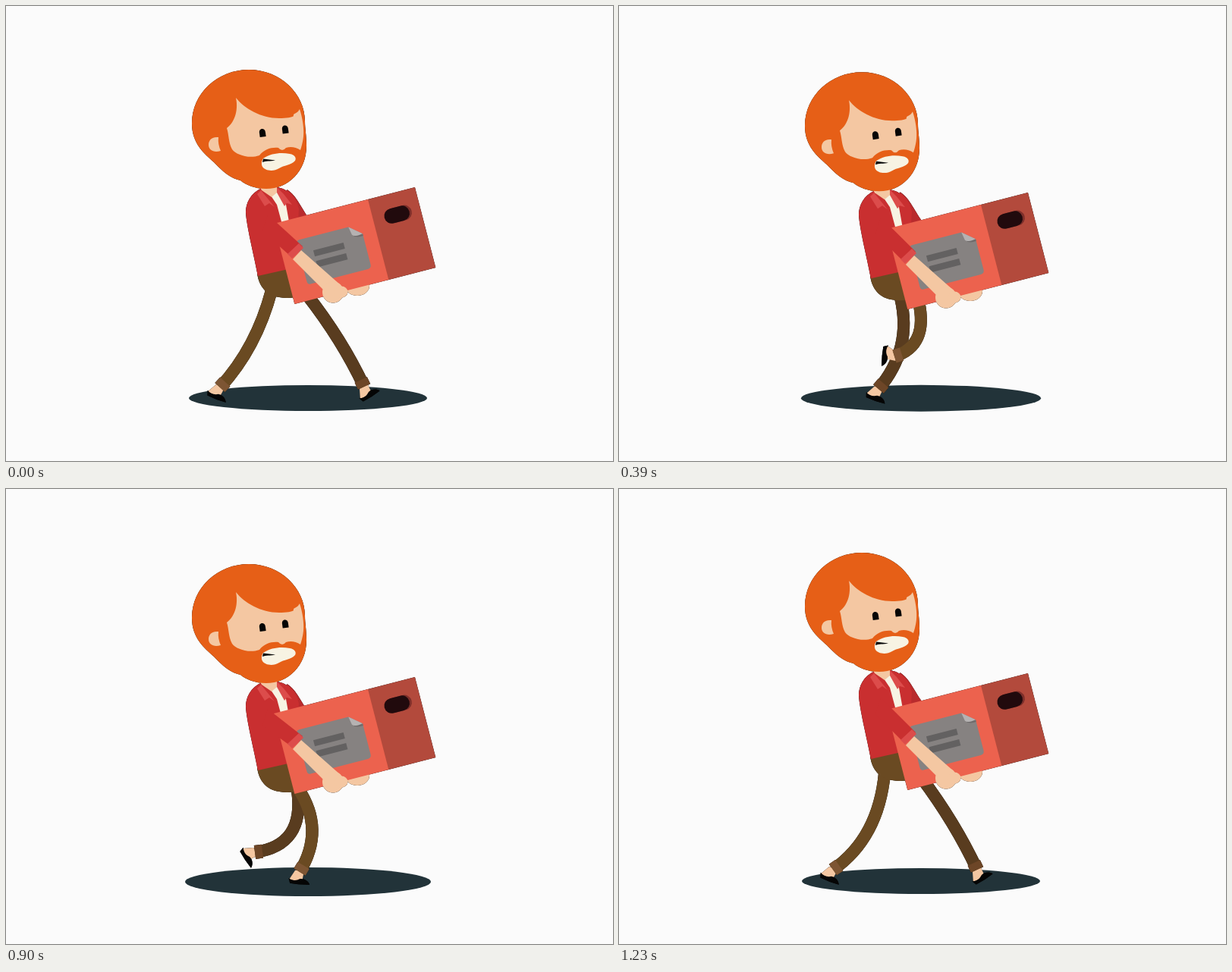
These frames come from a looping animation (800 by 600 pixels, 1260 ms). An HTML page with a canvas:

```html
<!DOCTYPE html>
<html lang="en">
<head>
<meta charset="utf-8">
<title>Carrying a box</title>
<style>
html, body { margin: 0; width: 100%; height: 100%; overflow: hidden; background: #fbfbfb; }
canvas { display: block; }
</style>
</head>
<body>
<canvas id="stage" width="800" height="600"></canvas>
<script>
const LOOP = 1260, STEP = 30;
const stage = document.getElementById('stage').getContext('2d');
const layer = document.createElement('canvas');
layer.width = 800;
layer.height = 600;
const ctx = layer.getContext('2d');

const SKIN = '#f4c7a2', HAIR = '#e65f17', RED = '#c92f30', FLAP = '#dc4c4b',
      CREAM = '#f7f3e3', PANTS = '#6a4a22', BLACK = '#050505';

// Vertical drop in px: [time, drop]
const BODY = [[0, 0], [270, 15], [440, 0], [630, 0], [900, 15], [1206, 0], [1260, 0]];
const BOX = [[0, 0], [275, 9.1], [390, 7], [630, 2], [700, .5], [900, 9], [1020, 7], [1230, 4], [1260, 3.3]];

// Leg poses: [time, hip x, y, bend x, y, ankle x, y, foot angle]
const NEAR_LEG = cyclic([
  [0, 350, 375, 330, 451, 282, 503, 20],
  [270, 365, 390, 368, 472, 315, 480, 88],
  [390, 395, 390, 408, 448, 363, 462, 94],
  [630, 387, 383, 434, 436, 461, 492, -15],
  [690, 386, 388, 434, 440, 446, 503, -4],
  [900, 385, 395, 421, 449, 387, 505, 3],
  [1020, 372, 388, 399, 440, 351, 505, 11],
  [1230, 350, 375, 342, 460, 282, 502, 20]
]);
const FAR_LEG = cyclic([
  [0, 396, 380, 443, 440, 472, 502, -34],
  [90, 394, 386, 440, 442, 445, 504, -6],
  [270, 393, 395, 424, 449, 387, 505, 3],
  [390, 371, 385, 387, 452, 342, 505, 18],
  [630, 359, 380, 355, 452, 303, 508, 48],
  [900, 384, 398, 394, 470, 328, 479, 55],
  [1020, 398, 390, 432, 437, 385, 484, 25],
  [1230, 398, 380, 443, 440, 472, 502, -34]
]);

function cyclic(keys) {
  const shift = (key, by) => [key[0] + by, ...key.slice(1)];
  return [shift(keys.at(-1), -LOOP), ...keys, shift(keys[0], LOOP), shift(keys[1], LOOP)];
}

// Monotone cubic interpolation between keys
function sample(keys, time) {
  let i = 0;
  while (i < keys.length - 2 && keys[i + 1][0] <= time) i++;
  const slope = (a, j) => keys[a] && keys[a + 1]
    ? (keys[a + 1][j] - keys[a][j]) / (keys[a + 1][0] - keys[a][0]) : 0;
  const tangent = (a, j) => {
    const before = slope(a - 1, j), after = slope(a, j);
    return before * after > 0 ? 2 * before * after / (before + after) : 0;
  };
  const p = keys[i], q = keys[i + 1], span = q[0] - p[0], u = (time - p[0]) / span;
  return p.slice(1).map((v, k) => {
    const j = k + 1, ease = u * u * (3 - 2 * u);
    return v + (q[j] - v) * ease
      + span * u * (1 - u) * ((1 - u) * tangent(i, j) - u * tangent(i + 1, j));
  });
}

function fill(color, d) {
  ctx.fillStyle = color;
  ctx.fill(new Path2D(d));
}

function oval(color, x, y, rx, ry = rx, target = ctx) {
  target.fillStyle = color;
  target.beginPath();
  target.ellipse(x, y, rx, ry, 0, 0, 7);
  target.fill();
}

function pill(color, x, y, w, h, r) {
  ctx.fillStyle = color;
  ctx.beginPath();
  ctx.roundRect(x, y, w, h, r);
  ctx.fill();
}

function placed(x, y, degrees, draw) {
  ctx.save();
  ctx.translate(x, y);
  ctx.rotate(degrees * Math.PI / 180);
  draw();
  ctx.restore();
}

function drawLeg([hx, hy, bx, by, ax, ay, angle], color, cuff) {
  placed(ax, ay, angle, () => {
    fill(SKIN, 'M-13 10L-6-2H6L4 11Q-4 14-13 10Z');
    fill(BLACK, 'M-14 9L-12 15.5Q0 17 14 16C12 11 6 8 1 9C-4 12-9 12-14 9Z');
  });
  ctx.lineWidth = 16;
  ctx.strokeStyle = color;
  ctx.beginPath();
  ctx.moveTo(hx, hy);
  ctx.quadraticCurveTo(bx, by, ax, ay);
  ctx.stroke();
  const len = Math.hypot(ax - bx, ay - by);
  ctx.lineWidth = 18;
  ctx.strokeStyle = cuff;
  ctx.beginPath();
  ctx.moveTo(ax - (ax - bx) / len * 10, ay - (ay - by) / len * 10);
  ctx.lineTo(ax, ay);
  ctx.stroke();
}

function drawTorso() {
  fill(PANTS, 'M331 352L370 344L382 384Q370 386 360 384C344 382 333 370 331 352Z');
  fill('#b92b2d', 'M370 242C384 250 389 268 403 285L380 300Z');
  fill(RED, 'M337 240C322 247 316 260 316 272C317 290 326 325 332 356L372 347L384 300'
    + 'L386 268C383 252 372 241 357 239Z');
  fill(CREAM, 'M347 247L357 240L369 262L374 290L364 288L357 262Z');
  fill(SKIN, 'M334 238H357V246L350 252L337 243Z');
  fill(FLAP, 'M336 243L354 265L347 260L341 264L331 248Z');
  fill(FLAP, 'M357 239L366 248L377 262L370 260L367 264L357 246Z');
}

function drawHead() {
  fill(HAIR, 'M245 155C245 115 279 84 320 84C362 84 394 116 394 152C394 162 396 170 396 184'
    + 'C396 218 372 241 343 241C328 241 316 236 309 230C297 228 284 217 274 206'
    + 'C262 195 245 182 245 155Z');
  fill(SKIN, 'M303 121C314 135 336 148 360 148C370 148 377 147 379 145C378 142 382 142 385 139'
    + 'L387 136C391 148 393 162 392 172C391 181 389 187 388 190C382 186 375 185 369 187'
    + 'Q364 193 359 187C350 186 340 189 334 197C320 202 303 196 298 189'
    + 'C293 180 294 170 291 161C303 152 306 135 303 121Z');
  fill(SKIN, 'M280 173C270 172 267 178 267 183C267 190 274 194 283 191Q279 182 280 173Z');
  for (const [x, y] of [[338, 167.5], [368, 163]])
    placed(x, y, -8, () => fill(BLACK, 'M-4 5V-1C-4-7 4-7 4-1V5Z'));
  fill(CREAM, 'M339 201C350 194 362 193 374 195C381 196 383 201 381 204'
    + 'C376 210 366 210 360 214C352 219 341 217 338 212C336 208 337 204 339 201Z');
  fill(BLACK, 'M339 201.5L355 203.5C348 205 342 204 338 206Z');
}

function drawBox() {
  placed(353, 287, -14.47, () => {
    fill('#b34a3c', 'M127 0H192V109.5H127Z');
    fill('#ec624e', 'M0 0H128V109.5H0Z');
    fill('#868281', 'M27 29H94L110 42V84Q110 89 105 89H27Q23 89 23 85V33Q23 29 27 29Z');
    fill('#6f6b6b', 'M96 40L110 42V45Q100 46 96 40Z');
    fill('#b5b2b2', 'M94 29L110 42Q98 44 96 40Z');
    for (const y of [47, 61.5]) fill('#636161', `M41.5 ${y}h41v8.5h-41Z`);
    pill('#7d2f2a', 146, 19, 34, 20, 10);
    pill('#210a0d', 143, 19, 34, 20, 10);
  });
}

function drawArm(body, box) {
  placed(0, box, 0, () => {
    fill(SKIN, 'M378 334L389 322L441 368L426 382Z');
    oval(SKIN, 431, 377.5, 14);
    oval(SKIN, 442, 377, 8.5, 7.5);
  });
  fill(RED, `M345 ${275 + body}L391 ${317 + box}L374 ${329 + box}L338 ${297 + body}Z`);
  placed(0, box, 0, () => fill(FLAP, 'M386 313L392 319L377 333L371 327Z'));
}

function draw(time) {
  const [body] = sample(BODY, time), [box] = sample(BOX, time), squash = body / 15;
  ctx.clearRect(0, 0, 800, 600);
  drawLeg(sample(FAR_LEG, time), '#593c1f', '#6d4627');
  drawLeg(sample(NEAR_LEG, time), PANTS, '#7d5533');
  placed(0, body, 0, drawTorso);
  placed(0, box, 0, () => {
    oval(SKIN, 463, 369, 16, 13);
    drawBox();
  });
  drawArm(body, box);
  placed(0, body, 0, drawHead);

  stage.fillStyle = '#fbfbfb';
  stage.fillRect(0, 0, 800, 600);
  oval('#223339', 398, 517 + squash, 157 + 5 * squash, 17 + 2 * squash, stage);
  // Hairline dark rim around the whole figure
  stage.save();
  stage.shadowColor = '#000';
  stage.shadowBlur = 1;
  stage.drawImage(layer, 0, 0);
  stage.restore();
}

const start = performance.now();
function tick() {
  const elapsed = (performance.now() - start) % LOOP;
  draw(Math.floor(elapsed / STEP) * STEP);
  requestAnimationFrame(tick);
}
tick();
</script>
</body>
</html>
```
